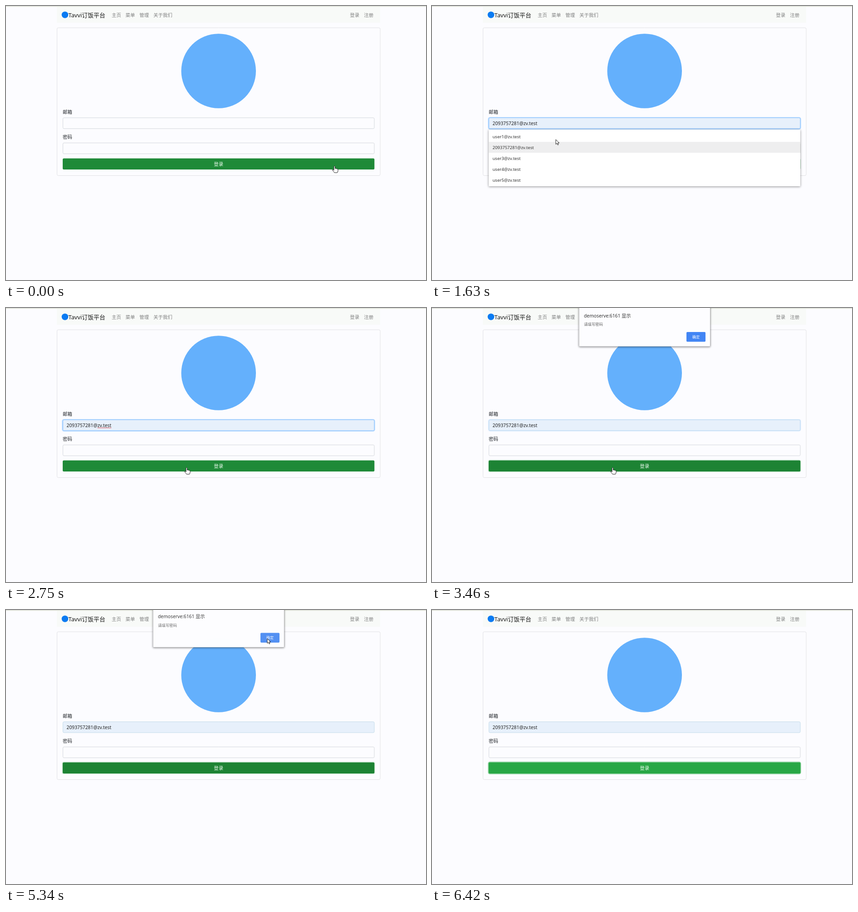
These frames come from a looping animation (926x605 px, 6920 ms). An HTML page with a canvas:

```html
<!DOCTYPE html>
<html lang="zh-CN">
<head>
<meta charset="utf-8">
<title>登录</title>
<style>
html, body { margin: 0; width: 100%; height: 100%; overflow: hidden; background: #fcfcff; }
canvas { display: block; }
</style>
</head>
<body>
<canvas id="stage" width="926" height="605"></canvas>
<script>
const ctx = document.getElementById('stage').getContext('2d');
const LOOP = 6920, FONT = '"Noto Sans", "Noto Sans CJK SC", "Noto Sans CJK", sans-serif';
const USER = '2093757281@', DOMAIN = 'zv.test', EMAIL = USER + DOMAIN;

// Pointer stops: time, x, y
const STOPS = [
  [0, 723, 353], [420, 723, 353], [960, 391, 261], [1350, 391, 261],
  [1750, 241, 304], [2040, 241, 308], [2170, 241, 310], [2620, 397, 352],
  [3840, 397, 352], [4490, 572, 61], [4590, 572, 61], [4900, 576, 63],
  [5920, 576, 63], [6060, 582, 90], [6390, 566, -20]
];

const ramp = (t, start, length = 150) => Math.min(1, Math.max(0, (t - start) / length));
const ease = p => p * p * (3 - 2 * p);
const mix = (a, b, p) => `rgb(${a.map((v, i) => Math.round(v + (b[i] - v) * p))})`;

function text(s, x, y, size, color, align = 'left') {
  ctx.font = `${size}px ${FONT}`;
  ctx.fillStyle = color;
  ctx.textAlign = align;
  ctx.fillText(s, x, y);
}

function box(x, y, w, h, r, fill, stroke) {
  ctx.beginPath();
  ctx.roundRect(x, y, w, h, r);
  if (fill) { ctx.fillStyle = fill; ctx.fill(); }
  if (stroke) { ctx.strokeStyle = stroke; ctx.lineWidth = 1; ctx.stroke(); }
}

function shadowed(blur, dy, paint) {
  ctx.save();
  ctx.shadowColor = 'rgba(0,0,0,.45)';
  ctx.shadowBlur = blur;
  ctx.shadowOffsetY = dy;
  paint();
  ctx.restore();
}

function ring(y, h, color, alpha) {
  if (alpha <= 0) return;
  ctx.save();
  ctx.globalAlpha = alpha;
  ctx.strokeStyle = color;
  ctx.lineWidth = 2;
  ctx.beginPath();
  ctx.roundRect(124.2, y - .8, 688.6, h + 1.6, 3.5);
  ctx.stroke();
  ctx.restore();
}

function drawPage() {
  ctx.fillStyle = '#fcfcff';
  ctx.fillRect(0, 0, 926, 605);
  ctx.fillStyle = '#dcdfd2';
  ctx.fillRect(0, 0, 926, 1.5);
  ctx.fillStyle = '#f8faf8';
  ctx.fillRect(112, 2, 713, 35);

  ctx.fillStyle = '#0b7bf2';
  ctx.beginPath();
  ctx.arc(130, 19.5, 7.3, 0, 7);
  ctx.fill();
  text('Tavvi订饭平台', 137.5, 25, 12.9, '#1a1a1a');
  [['主页', 233], ['菜单', 263.5], ['管理', 294.3], ['关于我们', 325], ['登录', 758.3], ['注册', 789.3]]
    .forEach(([label, x]) => text(label, x, 23.6, 10.4, '#7d7e7e'));

  box(112.5, 48, 712.5, 326.5, 3, null, '#e2e2e4');
  ctx.fillStyle = '#64b0fc';
  ctx.beginPath();
  ctx.arc(468.7, 143.5, 82.3, 0, 7);
  ctx.fill();
  text('邮箱', 125, 237.8, 10.4, '#212529');
  text('密码', 125, 293.3, 10.4, '#212529');
}

function drawForm(t) {
  const focus = ramp(t, 1200) - ramp(t, 3180, 400);
  const filled = t >= 1620;
  ring(247, 24, '#bfdeff', focus);
  const idle = filled ? [195, 220, 234] : [211, 215, 220];
  box(125.5, 246.8, 686.5, 24, 2.5, filled ? '#e7f0fb' : '#fcfcff', mix(idle, [128, 189, 255], focus));
  box(125.5, 302.3, 686.5, 24, 2.5, null, '#d5d8dc');

  let caretX = 133.5;
  if (filled) {
    text(EMAIL, 133.5, 262.7, 10.3, '#222');
    const start = 133.5 + ctx.measureText(USER).width;
    caretX = 133.5 + ctx.measureText(EMAIL).width;
    if (t >= 2040 && t < 3180) {
      ctx.fillStyle = '#e0565b';
      ctx.fillRect(start, 264.3, caretX - start, 1);
    }
  }
  if ((t > 1230 && t < 1620) || (t >= 2040 && t < 2590)) {
    ctx.fillStyle = '#222';
    ctx.fillRect(caretX + .5, 252, 1, 13);
  }

  const closed = ramp(t, 5480);
  const hover = 1 - ramp(t, 560) + ramp(t, 2570) - closed;
  const press = ramp(t, 3140) - closed;
  ring(336.5, 24.5, '#93d3a2', .35 * press + closed);
  const base = [40, 167, 69], dark = press > 0 ? [29, 131, 52] : [31, 138, 56];
  box(125, 336.5, 687.3, 24.5, 2.5, mix(base, dark, hover));
  text('登录', 468.7, 352.8, 10.4, '#f4fff6', 'center');
}

function drawSuggestions(t) {
  if (t < 1300 || t >= 2040) return;
  shadowed(5, 1, () => box(125, 273, 687, 125, 1, '#fff'));
  for (let i = 0; i < 5; i++) {
    const y = 276 + i * 24;
    if (i === 1 && t >= 1620) {
      ctx.fillStyle = '#eeeeef';
      ctx.fillRect(125, y, 687, 24);
    }
    text(i === 1 ? EMAIL : `user${i + 1}@${DOMAIN}`, 133.5, y + 15.5, 9.5, '#333');
  }
}

function drawAlert(t) {
  if (t < 3170 || t > 5480) return;
  const enter = ease(ramp(t, 3170, 200)), leave = ramp(t, 5300, 180);
  ctx.save();
  ctx.globalAlpha = enter * (1 - leave * leave);
  ctx.translate(0, -11 * (1 - enter + leave));
  shadowed(4, 1, () => box(324.5, -20, 288.5, 104.5, 1, '#fff', '#a9a9ab'));
  box(324.5, -20, 288.5, 104.5, 1, '#fdfdff');
  text('demoserve:6161 显示', 335, 20.6, 10.3, '#333');
  text('请填写密码', 335, 39.2, 8.4, '#666');
  box(561, 53, 42, 21.5, 2, t > 4460 ? '#4a8bf2' : '#4285f4');
  text('确定', 582, 67, 8.2, '#fff', 'center');
  ctx.restore();
}

const ARROW = new Path2D('M0 0V10.5L2.5 8.2L4.2 12L6 11.2L4.3 7.5H7.6Z');
const HAND = new Path2D('M0 1.2Q1.3-.6 2.5 1.2V6Q4 5 5 6.2Q6.6 5.6 7.2 6.9Q9 6.5 9 8.5V11Q8.6 13 7.4 15H1.2Q-.6 12.4-3 10Q-3.8 8.3-2 8.2L0 9.8Z');

function drawPointer(t) {
  let i = STOPS.findIndex(s => s[0] > t);
  if (i < 0) return;
  const a = STOPS[i - 1], b = STOPS[i], p = ease((t - a[0]) / (b[0] - a[0]));
  const x = a[1] + (b[1] - a[1]) * p, y = a[2] + (b[2] - a[2]) * p;
  const inRow = x > 125 && x < 812;
  const overButton = inRow && y > 336 && y < 361 && t < 5900;
  const overPopup = t >= 1300 && t < 2040 && y > 273;
  const overInput = inRow && !overPopup && ((y > 246 && y < 271) || (y > 302 && y < 327));
  ctx.save();
  ctx.translate(x, y);
  ctx.lineWidth = 1;
  if (overInput && (t < 3130)) {
    ctx.strokeStyle = '#444';
    ctx.beginPath();
    ctx.moveTo(-2.5, -5); ctx.lineTo(2.5, -5);
    ctx.moveTo(0, -5); ctx.lineTo(0, 5);
    ctx.moveTo(-2.5, 5); ctx.lineTo(2.5, 5);
    ctx.stroke();
  } else {
    const shape = overButton ? HAND : ARROW;
    ctx.fillStyle = '#fff';
    ctx.strokeStyle = '#222';
    ctx.fill(shape);
    ctx.stroke(shape);
  }
  ctx.restore();
}

const begin = performance.now();
function frame() {
  const t = (performance.now() - begin) % LOOP;
  drawPage();
  drawForm(t);
  drawSuggestions(t);
  drawAlert(t);
  drawPointer(t);
  requestAnimationFrame(frame);
}
frame();
</script>
</body>
</html>
```
